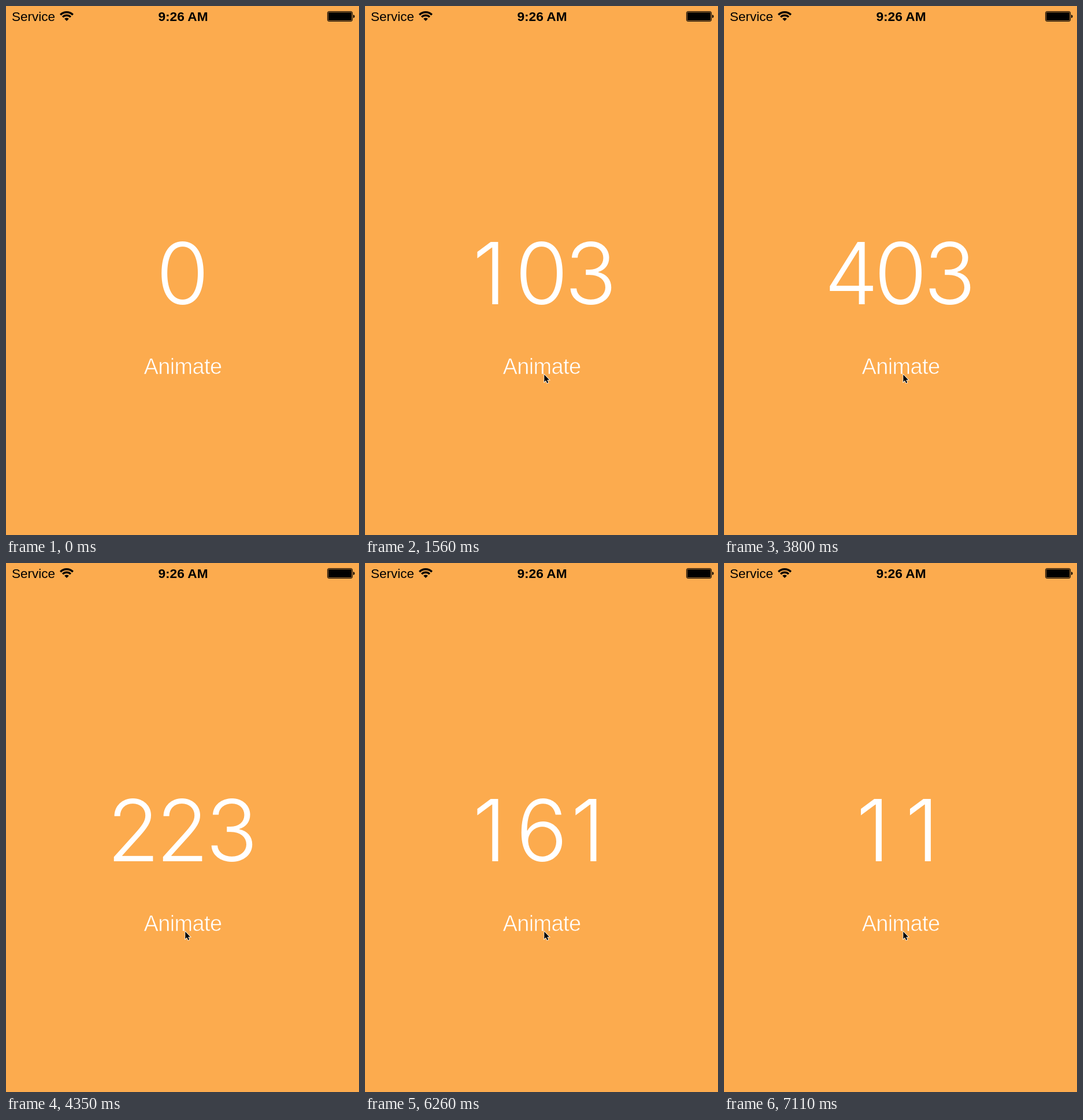
These frames come from a looping animation (611 by 917 pixels, 8000 ms). An HTML page:

```html
<!DOCTYPE html>
<html lang="en">
<head>
<meta charset="utf-8">
<title>Animated counter</title>
<style>
  html, body { margin: 0; width: 100%; height: 100%; overflow: hidden; background: #fcab4e; }
  svg { display: block; width: 100%; height: 100%; }
  .status { font: 22.5px "Liberation Sans", Arial, sans-serif; }
  .clock { font-weight: bold; font-size: 22.7px; }
  /* The background-coloured outline thins the letters to a light weight */
  .button { font: 38px "Liberation Sans", Arial, sans-serif; letter-spacing: -.6px;
            fill: #fff; stroke: #fcab4e; stroke-width: .7px; }
  .counter { font: 300 148.5px Inter, sans-serif; fill: #fff; }
</style>
</head>
<body>
<svg viewBox="0 0 611 917">
  <text class="status" x="10" y="26">Service</text>
  <g fill="none" stroke="#000" stroke-width="3.4">
    <path d="M94.2 15.2a15.3 15.3 0 0 1 21.6 0M98.1 19.1a9.7 9.7 0 0 1 13.8 0"/>
    <path d="M105 26l-3.9-3.9a5.5 5.5 0 0 1 7.8 0z" fill="#000" stroke="none"/>
  </g>
  <text class="status clock" x="306.5" y="26" text-anchor="middle">9:26 AM</text>
  <rect x="556.5" y="9.5" width="43" height="17" rx="2.5" fill="none" stroke="#000"/>
  <rect x="557.7" y="10.7" width="40.6" height="14.6" rx="1"/>
  <path d="M601 15q2.5 .5 2.5 3t-2.5 3z"/>

  <text class="counter" id="counter" y="517">0</text>
  <text class="button" x="306" y="638" text-anchor="middle">Animate</text>
  <path id="cursor" d="M0 0V12.6L2.8 9.9 4.9 14.7 6.9 13.8 4.9 9.2H8.8Z"
        stroke="#fff" stroke-width="1.6" paint-order="stroke"/>
</svg>
<script>
const LOOP = 8000, TICK = 10, CENTER = 305.8, PITCH = 85;
const counter = document.getElementById('counter');
const cursor = document.getElementById('cursor');

const counts = [
  { start: 1231, end: 2170, from: 0, to: 405 },
  { start: 3739, end: 4673, from: 405, to: 162 },
  { start: 6190, end: 7110, from: 162, to: 11 }
];

const progress = (t, start, end) => Math.min(1, Math.max(0, (t - start) / (end - start)));

// cubic-bezier(.42, 0, .58, 1), solved for x by bisection
function easeInOut(x) {
  if (x <= 0 || x >= 1) return x;
  let low = 0, high = 1;
  for (let i = 0; i < 30; i++) {
    const s = (low + high) / 2, r = 1 - s;
    if (1.26 * r * r * s + 1.74 * r * s * s + s ** 3 < x) low = s; else high = s;
  }
  return low * low * (3 - 2 * low);
}

// Offset from a cell's centre to the glyph origin: centre the ink, but align the 1 by its stem
const pen = document.createElement('canvas').getContext('2d');
pen.font = '300 148.5px Inter, sans-serif';
const digitOffsets = [...'0123456789'].map(digit => {
  const ink = pen.measureText(digit);
  return digit === '1'
    ? 10.4 - ink.actualBoundingBoxRight
    : (ink.actualBoundingBoxLeft - ink.actualBoundingBoxRight) / 2;
});

function valueAt(t) {
  let value = 0;
  for (const { start, end, from, to } of counts) {
    if (t >= start) value = from + Math.trunc((to - from) * easeInOut(progress(t, start, end)));
  }
  return value;
}

function showNumber(value) {
  const digits = String(value);
  const first = CENTER - PITCH * (digits.length - 1) / 2;
  counter.textContent = digits;
  counter.setAttribute('x', [...digits].map((d, i) => first + i * PITCH + digitOffsets[d]).join(' '));
}

function moveCursor(t) {
  const rest = (1 - progress(t, 380, 910)) ** 2;
  cursor.setAttribute('transform', `translate(${310.3 - 21 * rest} ${639 + 268 * rest})`);
  cursor.setAttribute('visibility', t < 390 ? 'hidden' : 'visible');
}

function draw(now) {
  const t = Math.floor(now % LOOP / TICK) * TICK;
  showNumber(valueAt(t));
  moveCursor(t);
  requestAnimationFrame(draw);
}
draw(0);
</script>
</body>
</html>
```
